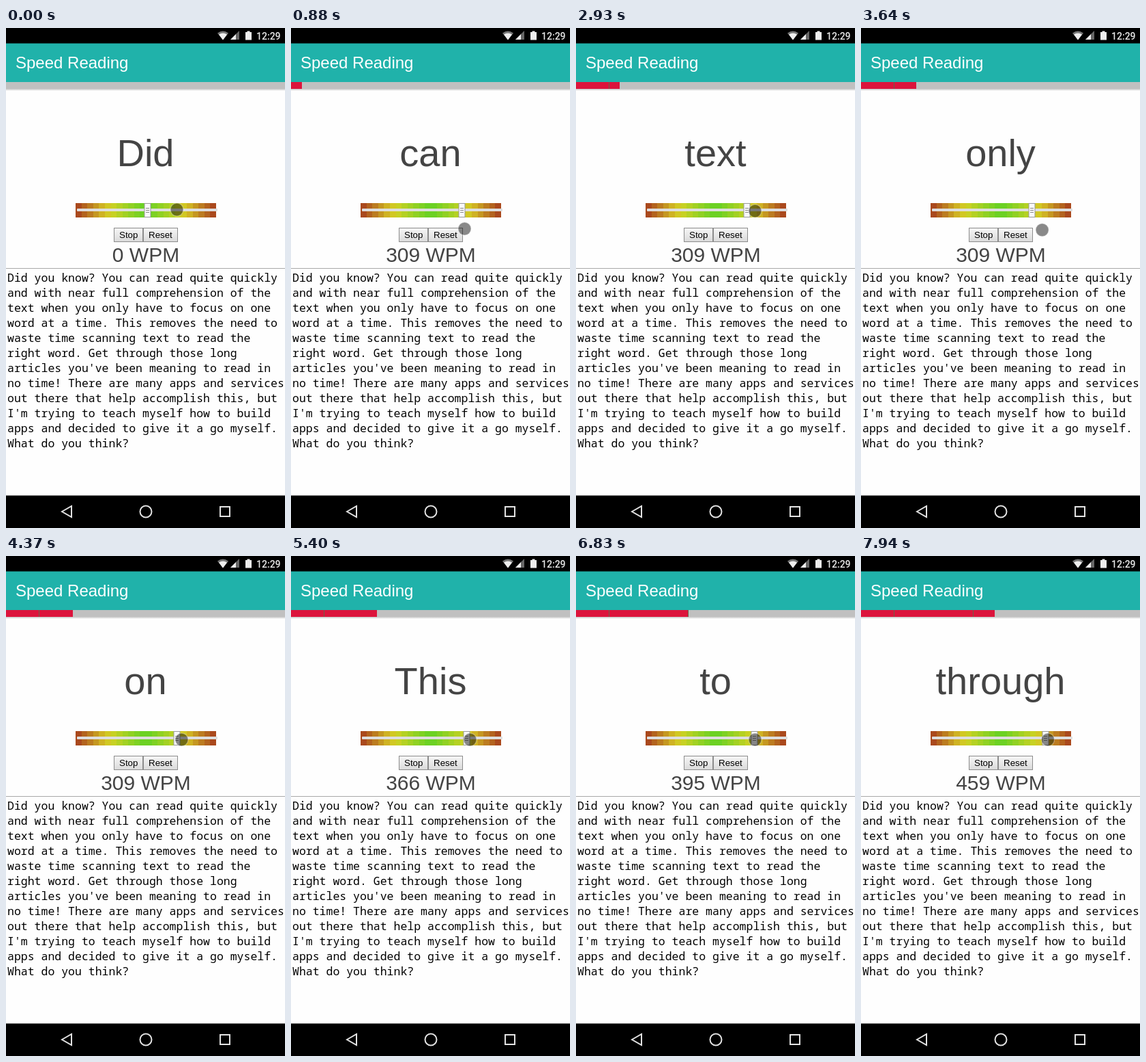
These frames come from a looping animation (409 px wide and 731 px high, 7.99 s). An HTML page:

```html
<!DOCTYPE html>
<html lang="en">
<head>
<meta charset="utf-8">
<title>Speed Reading</title>
<style>
  html, body { margin: 0; width: 100%; height: 100%; overflow: hidden; background: #fefefe; }
  svg { display: block; width: 100vw; height: 100vh; }
  text { font-family: "Liberation Sans", Arial, sans-serif; }
  .mid { text-anchor: middle; fill: #444; }
  .article text { font: 16.5px "Noto Sans Mono", monospace; fill: #000; }
  .button { fill: url(#face); stroke: #8c8c8c; }
  .label { font-size: 13.33px; }
  .nav { fill: none; stroke: #e2e2e2; stroke-width: 2; }
</style>
</head>
<body>
<svg viewBox="0 0 409 731" xmlns="http://www.w3.org/2000/svg">
  <defs>
    <linearGradient id="face" x2="0" y2="1">
      <stop stop-color="#f6f6f6"/><stop offset="1" stop-color="#dadada"/>
    </linearGradient>
    <linearGradient id="shade" x2="0" y2="1">
      <stop stop-color="#000" stop-opacity=".22"/><stop offset="1" stop-color="#000" stop-opacity="0"/>
    </linearGradient>
  </defs>
  <rect width="409" height="731" fill="#fefefe"/>

  <rect width="409" height="23"/>
  <path d="M310 7.5Q318 1.5 326 7.5L318 17.5Z" fill="#777"/>
  <path d="M312 9.5Q318 5.5 324 9.5L318 17.5Z" fill="#eee"/>
  <path d="M342 4V17H329Z" fill="#666"/>
  <path d="M337 9V17H329Z" fill="#eee"/>
  <path d="M351 6H353.5V4.5H357.5V6H360V17.5H351Z" fill="#eee"/>
  <text x="367" y="17" style="font:500 14px Roboto,sans-serif" fill="#e8e8e8">12:29</text>

  <rect y="22.5" width="409" height="56.5" fill="#20b2aa"/>
  <text x="14" y="59" font-size="24" fill="#fff">Speed Reading</text>
  <rect y="79" width="409" height="10" fill="#c0c0c0"/>
  <rect id="bar" y="79" height="10" fill="#dc143c"/>
  <g id="seams"></g>
  <rect y="89" width="409" height="3" fill="url(#shade)"/>

  <text id="word" class="mid" x="204.5" y="202" font-size="56"></text>

  <g id="bands" shape-rendering="crispEdges"></g>
  <rect x="104" y="264" width="206" height="4" rx="1" fill="#dedede"/>
  <g id="thumb">
    <rect x="-4.5" y="256.5" width="9" height="20" fill="#f8f8f8" stroke="#999"/>
    <path d="M-2.5 263.5h5m-5 3h5m-5 3h5" stroke="#888"/>
  </g>

  <rect class="button" x="158.5" y="292.5" width="42" height="20"/>
  <rect class="button" x="201.5" y="292.5" width="50" height="20"/>
  <text class="label" x="166" y="307">Stop</text>
  <text class="label" x="209" y="307">Reset</text>
  <text id="rate" class="mid" x="205" y="342" font-size="30"></text>

  <rect y="351" width="409" height="1" fill="#a9a9a9"/>
  <g id="article" class="article"></g>

  <rect y="683.5" width="409" height="47.5"/>
  <path class="nav" d="M82 707L96 699V715Z"/>
  <circle class="nav" cx="205" cy="707" r="8.5"/>
  <rect class="nav" x="314" y="700" width="14" height="14"/>

  <circle id="cursor" r="9.5" fill="#000" fill-opacity=".46" stroke="#fff" stroke-opacity=".3" stroke-width="1.5"/>
</svg>
<script>
const LOOP = 7990;
const lines = [
  "Did you know? You can read quite quickly",
  "and with near full comprehension of the",
  "text when you only have to focus on one",
  "word at a time. This removes the need to",
  "waste time scanning text to read the",
  "right word. Get through those long",
  "articles you've been meaning to read in",
  "no time! There are many apps and services",
  "out there that help accomplish this, but",
  "I'm trying to teach myself how to build",
  "apps and decided to give it a go myself.",
  "What do you think?"
];
const words = lines.join(" ").split(" ");

// Slider settings, each with the time it is chosen
const rates = [
  { at: 0, wpm: 0 }, { at: 100, wpm: 309 }, { at: 4700, wpm: 366 },
  { at: 6710, wpm: 395 }, { at: 7640, wpm: 459 }
];
const home = { x: 250.5, y: 265.5 };
const moves = [
  { at: 150, time: 350, x: 254.5, y: 293.5 },
  { at: 1770, time: 600, x: 262.5, y: 267.5 },
  { at: 3390, time: 360, x: 266.5, y: 303 },
  { at: 3760, time: 440, x: 257.5, y: 268.5 },
  { at: 4600, time: 200, x: 262.5, y: 268.5 },
  { at: 7530, time: 300, x: 274, y: 268.5 }
];

const byId = id => document.getElementById(id);
const set = (id, attrs) => Object.entries(attrs).forEach(([k, v]) => byId(id).setAttribute(k, v));

function add(parent, tag, attrs, content = "") {
  const node = document.createElementNS("http://www.w3.org/2000/svg", tag);
  Object.entries(attrs).forEach(([k, v]) => node.setAttribute(k, v));
  node.textContent = content;
  byId(parent).append(node);
  return node;
}

// Words read so far; the pace picks up once the slider is dragged
const wordsRead = t => (309 * t + (363 - 309) * Math.max(0, t - 4740)) / 60000;

function cursorAt(t) {
  return moves.reduce((p, m) => {
    const k = Math.min(1, Math.max(0, (t - m.at) / m.time));
    const ease = k * k * (3 - 2 * k);
    return { x: p.x + (m.x - p.x) * ease, y: p.y + (m.y - p.y) * ease };
  }, home);
}

// Mirrored bands run from red at both ends to green in the middle
const BANDS = 12, HALF = 103;
for (let i = 0; i < BANDS; i++) {
  const x = Math.round(i * HALF / BANDS);
  const width = Math.round((i + 1) * HALF / BANDS) - x;
  const f = (i + 0.5) / BANDS;
  const fill = `hsl(${13 + 85 * f ** 0.85} 71% ${38 + 10 * Math.min(1, 2.5 * f)}%)`;
  for (const left of [102 + x, 308 - x - width])
    add("bands", "rect", { x: left, y: 256, width, height: 21, fill });
}

const seams = [48, 164].map(x => ({
  x, node: add("seams", "rect", { x, y: 79, width: 1, height: 10, fill: "#6a6448" })
}));

lines.forEach((line, i) => add("article", "text", { x: 2, y: 371 + 22 * i }, line));

function draw(t) {
  const read = wordsRead(t);
  const { wpm } = rates.findLast(r => r.at <= t);
  const done = Math.round(409 * Math.max(0, read - 1.1) / words.length);
  const cursor = cursorAt(t);
  byId("word").textContent = words[Math.floor(read)];
  byId("rate").textContent = wpm + " WPM";
  set("bar", { width: done });
  seams.forEach(s => s.node.setAttribute("opacity", done > s.x ? 1 : 0));
  set("thumb", { transform: `translate(${207.5 + Math.floor(wpm * 0.1392)} 0)` });
  set("cursor", { cx: cursor.x, cy: cursor.y });
}

const start = performance.now();
function tick() {
  draw((performance.now() - start) % LOOP);
  requestAnimationFrame(tick);
}
tick();
</script>
</body>
</html>
```
